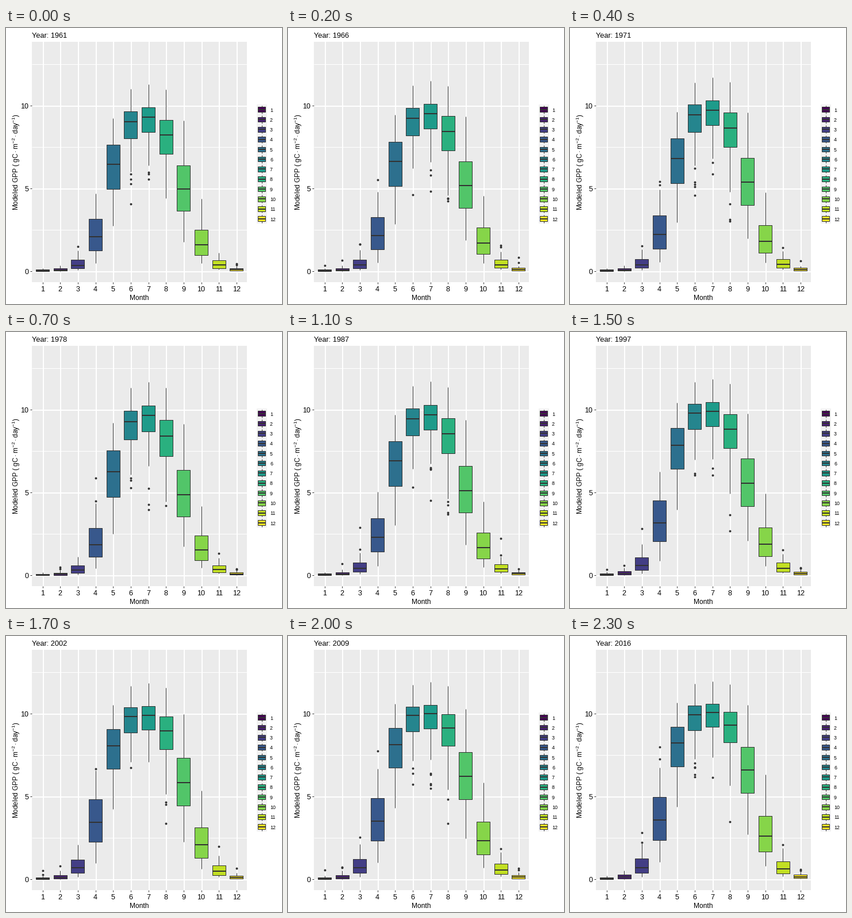
Animation of 480 by 480 pixels, one loop 2.4 s. Source, as a matplotlib script:

```python
import numpy as np
import matplotlib.pyplot as plt
from matplotlib.animation import FuncAnimation
from matplotlib.patches import Rectangle

SIZE, DPI = 480, 72          # at 72 dpi one point is one pixel
FRAMES, INTERVAL = 24, 100
FIRST, LAST = 1961, 2016
LEFT, RIGHT, TOP, BOTTOM = 45, 419, 24, 442
STEP = (RIGHT - LEFT) / 12.2
HALF = 0.375 * STEP
DARK, PANEL, KEY_BG = "#333333", "#EBEBEB", "#F2F2F2"
MONTHS = np.arange(1, 13)
COLORS = plt.get_cmap("viridis")(np.linspace(0, 1, 12))

# Seasonal curve of each box statistic:
# winter level, peak, spring month and width, autumn month and width
CURVES = {"lo": (0.00, 8.00, 5.15, 0.48, 8.27, 0.66),
          "q1": (0.00, 9.30, 4.76, 0.49, 8.84, 0.58),
          "med": (0.03, 10.10, 4.54, 0.50, 9.07, 0.60),
          "q3": (0.08, 10.50, 4.31, 0.52, 9.36, 0.60),
          "hi": (0.15, 11.70, 4.10, 0.55, 9.77, 0.54)}

# How peak height, spring and autumn drift over the years
KEY_YEARS = (1961, 1971, 1978, 1987, 1992, 2002, 2016)
PEAK = (-0.4, 0.0, 0.0, 0.0, 0.15, 0.1, 0.2)
SPRING = (0.12, 0.10, 0.22, 0.08, -0.07, -0.20, -0.22)
AUTUMN = (-0.05, 0.0, -0.12, -0.06, -0.05, 0.10, 0.27)

plt.rcParams.update({"font.family": "Liberation Sans",
                     "mathtext.fontset": "custom",
                     "mathtext.rm": "Liberation Sans",
                     "mathtext.default": "regular"})


def logistic(x):
    return 1 / (1 + np.exp(-x))


def season(year):
    """Box statistics of all months, one row per statistic."""
    peak, spring, autumn = (np.interp(year, KEY_YEARS, keys)
                            for keys in (PEAK, SPRING, AUTUMN))
    return np.array([
        base + (top + peak) * logistic((MONTHS - up - spring) / rise)
        * logistic((down + autumn - MONTHS) / fall)
        for base, top, up, rise, down, fall in CURVES.values()])


def outliers(year, month, lo, hi):
    """Low stragglers in summer, high ones in the cold months."""
    rng = np.random.default_rng(100 * year + month)
    if 6 <= month <= 8:
        dots = lo - 0.15 - rng.exponential(1.1, rng.poisson(2.2))
        return dots[dots > 1.5]
    if month <= 4 or month >= 11:
        return hi + 0.06 + rng.exponential(0.08 + 0.12 * hi, rng.poisson(1.3))
    return np.array([])


def px(month):
    return LEFT + 0.25 + (month - 0.4) * STEP


def py(value):
    return 423.2 - 28.8 * np.asarray(value)


fig = plt.figure(figsize=(SIZE / DPI, SIZE / DPI), dpi=DPI, facecolor="white")
ax = fig.add_axes([0, 0, 1, 1])
ax.set(xlim=(0, SIZE), ylim=(SIZE, 0))
ax.axis("off")


def line(x, y, color=DARK, width=1, z=2):
    return ax.plot(x, y, color=color, lw=width, solid_capstyle="butt", zorder=z)[0]


def box(x, y, w, h, fill, edge="none", z=1):
    return ax.add_patch(Rectangle((x, y), w, h, fc=fill, ec=edge, lw=1, zorder=z))


def label(x, y, text, size=12, ha="center", **kw):
    return ax.text(x, y, text, size=size, ha=ha, va="baseline", color="black", **kw)


# Panel, grid and axes; major grid lines are two pixels wide
box(LEFT, TOP, RIGHT - LEFT, BOTTOM - TOP, PANEL, z=0)
for v in np.arange(2.5, 13, 5):
    line((LEFT, RIGHT), (py(v), py(v)), "white", z=1)
for v in (0, 5, 10):
    line((LEFT, RIGHT), (py(v) + 1, py(v) + 1), "white", 2, z=1)
    line((LEFT - 3, LEFT), (py(v), py(v)))
    label(39.5, py(v) + 4.8, str(v), size=12.5, ha="right")
for m in MONTHS:
    line((px(m) + 1, px(m) + 1), (TOP, BOTTOM), "white", 2, z=1)
    line((px(m), px(m)), (BOTTOM, BOTTOM + 3))
    label(px(m), 458, str(m), size=12.5)
label((LEFT + RIGHT) / 2 - 0.5, 473, "Month")
label(22, 233, r"Modeled GPP ( gC$\,$·$\,$m$^{-2}\,$·$\,$day$^{-1}$)", size=11.7,
      rotation=90, rotation_mode="anchor")
title = label(LEFT, 17, "", size=12.8, ha="left")

# Legend
KEY, KEY_X = 17.28, 444.9
for m, color in zip(MONTHS, COLORS):
    y = 141.7 + (m - 1) * KEY
    box(KEY_X - KEY / 2, y - KEY / 2, KEY, KEY, KEY_BG, z=0)
    line((KEY_X, KEY_X), (y - 0.4 * KEY, y + 0.4 * KEY))
    box(KEY_X - 0.375 * KEY, y - KEY / 4, 0.75 * KEY, KEY / 2, color, DARK, z=3)
    line((KEY_X - 0.375 * KEY, KEY_X + 0.375 * KEY), (y, y), width=2, z=4)
    label(459, y + 3.8, str(m), size=8.8, ha="left")


class BoxPlot:
    def __init__(self, month, color):
        self.month, self.x = month, px(month)
        self.whisker = line((self.x, self.x), (0, 0), z=3)
        self.body = box(self.x - HALF, 0, 2 * HALF, 0, color, DARK, z=4)
        self.median = line((self.x - HALF, self.x + HALF), (0, 0), width=2, z=5)
        self.dots = ax.plot([], [], "o", color=DARK, ms=3.9, mew=0, zorder=3)[0]

    def set(self, year, stats):
        lo, q1, med, q3, hi = py(stats)
        self.whisker.set_ydata((lo, hi))
        self.body.set_y(q3)
        self.body.set_height(q1 - q3)
        self.median.set_ydata((med, med))
        dots = outliers(year, self.month, stats[0], stats[4])
        self.dots.set_data(np.full(len(dots), self.x), py(dots))


plots = [BoxPlot(m, c) for m, c in zip(MONTHS, COLORS)]


def update(i):
    year = round(FIRST + (LAST - FIRST) * i / (FRAMES - 1))
    title.set_text(f"Year: {year}")
    for plot, stats in zip(plots, season(year).T):
        plot.set(year, stats)
    return []


anim = FuncAnimation(fig, update, frames=FRAMES, interval=INTERVAL,
                     repeat=True, repeat_delay=0)
plt.show()
```
